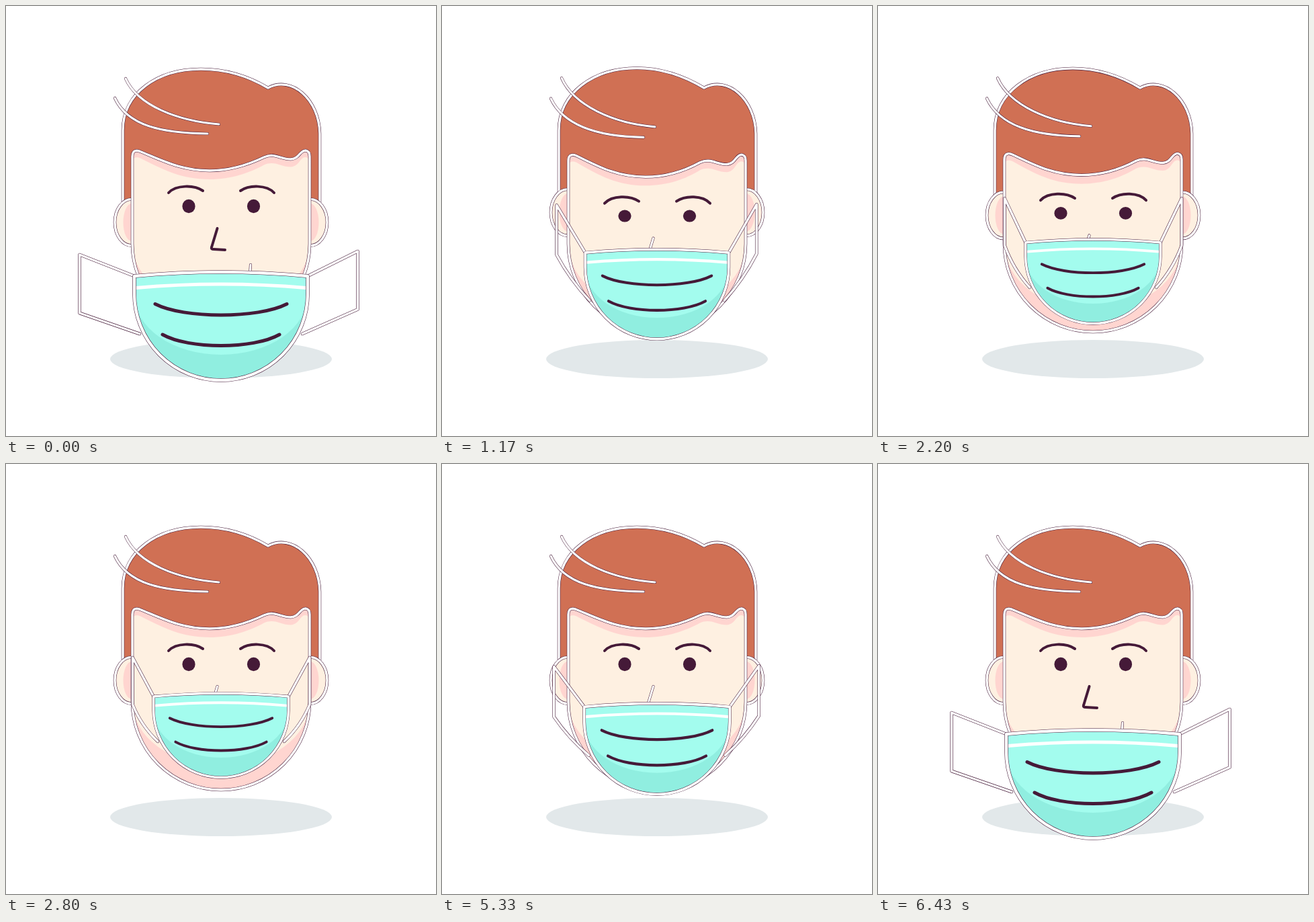
An HTML page with a canvas that plays this animation: 640 by 640 pixels, repeating every 7210 ms.

```html
<!DOCTYPE html>
<html lang="en">
<head>
<meta charset="utf-8">
<title>Putting on a mask</title>
<style>
html, body { margin: 0; height: 100%; overflow: hidden; background: #fff; }
canvas { display: block; width: 100vmin; height: 100vmin; }
</style>
</head>
<body>
<canvas id="stage" width="640" height="640"></canvas>
<script>
const ctx = document.getElementById('stage').getContext('2d');
const LOOP = 7210;
const DARK = '#451a38', HAIR = '#d07054', SKIN = '#fef0e1', PINK = '#ffd5d0';
const MINT = '#a3fcee', TEAL = '#90eee0', GROUND = '#e2e8ea';
ctx.lineCap = ctx.lineJoin = 'round';

function ease(t, from, to) {
  const x = Math.min(1, Math.max(0, (t - from) / (to - from)));
  return x * x * (3 - 2 * x);
}

function fill(path, color) {
  ctx.fillStyle = color;
  ctx.fill(new Path2D(path));
}

function stroke(path, color, width) {
  ctx.strokeStyle = color;
  ctx.lineWidth = width;
  ctx.stroke(new Path2D(path));
}

// White lines with a hairline dark edge, merged where they cross
function outline(width, ...paths) {
  paths.forEach(p => stroke(p, DARK, width));
  paths.forEach(p => stroke(p, '#fff', width - 1.1));
}

function ellipse(x, y, rx, ry, color) {
  ctx.fillStyle = color;
  ctx.beginPath();
  ctx.ellipse(x, y, rx, ry, 0, 0, 7);
  ctx.fill();
}

function clipped(path, draw) {
  ctx.save();
  ctx.clip(new Path2D(path));
  draw();
  ctx.restore();
}

// c and m lower the corners and the middle of the fringe; ry is the chin depth
function facePath(c, m, ry) {
  const w = (c + m) / 2;
  return `M188 354V${224 + c}C188 ${214 + c} 195 ${214 + c} 201 ${217 + c}
    C235 ${231 + m} 262 ${245 + m} 303 ${245 + m}
    C336 ${245 + m} 363 ${235 + m} 384 ${225 + w}
    C400 ${218 + w} 408 ${228 + w} 424 ${228 + w}
    C437 ${227 + w} 437 ${215 + c} 446 ${215 + c}
    Q452 ${216 + c} 452 ${224 + c}V354A132 ${ry} 0 0 1 188 354Z`;
}

function drawHead(nod) {
  const top = 94 - 2 * nod, earY = 322 - 19 * nod;
  const hair = `M174 ${earY}V185C174 130 225 ${top} 290 ${top}
    C330 ${top} 365 107 390 122C425 103 466 139 467 190V${earY}`;
  const end1 = 176 + 5 * nod, end2 = 190 + 7 * nod;
  fill(hair, HAIR);
  outline(4.5, hair);
  outline(4.2,
    `M178 ${108 - nod}C196 148 255 ${end1 - 5} 317 ${end1}`,
    `M162 ${137 + nod}C181 178 230 ${end2 - 1} 300 ${end2}`);

  for (const x of [187, 453]) {
    const ear = `M${x - 25} ${earY}a25 34.5 0 1 1 50 0a25 34.5 0 1 1 -50 0`;
    fill(ear, SKIN);
    ellipse(x, earY, 12.5, 28, PINK);
    outline(4.5, ear);
  }

  const c = 8 * nod, m = 12 * nod;
  const face = facePath(c, m, 131);
  fill(face, PINK);
  clipped(face, () => fill(facePath(c + 10, m + 13, 95 + 7 * nod), SKIN));
  outline(4.5, face);
}

function drawFeatures(nod, maskTop) {
  ctx.save();
  ctx.translate(0, 18.8 * nod);
  for (const x of [272, 368.5]) ellipse(x, 298, 9.6, 10.2 - 1.5 * nod, DARK);
  const lift = 1.5 * nod;
  stroke(`M242 ${278 + lift}C253 ${266 + lift} 280 ${266 + lift} 293 ${275 + lift}`, DARK, 4);
  stroke(`M349 ${275 + lift}C362 ${266 + lift} 388 ${266 + lift} 399 ${278 + lift}`, DARK, 4);
  const nose = 'M314.5 331L306 359Q305 362 309 362L326 363';
  const covered = 365 + 18.8 * nod > maskTop - 2.5;
  if (covered) outline(4, nose);
  else stroke(nose, DARK, 4);
  ctx.restore();
  outline(4, `M364 ${385 + 12 * nod}L363 ${400 + 12 * nod}`);
}

function drawMask(on, nod, top) {
  const s = 1 - 0.222 * on;
  const strap = (side, x, y1, y2) => {
    const bx = 320 + side * 121 * s, by = top + 92 * s;
    return `M${320 + side * 129 * s} ${top + 6 * s}L${x} ${y1}V${y2}
      Q${(x + bx) / 2 + side * 6 * on} ${(y2 + by) / 2 + 4 * on} ${bx} ${by}`;
  };
  const lift = 45 * on * (1 - on) + 3 * nod;
  outline(4.5,
    strap(-1, 109.5 + 79 * on, 370 - 82 * on - lift, 457 - 99 * on - lift),
    strap(1, 523.5 - 71.5 * on, 365 - 77 * on - lift, 451.5 - 93.5 * on - lift));

  ctx.save();
  ctx.translate(320, top);
  ctx.scale(s, s);
  const mask = 'M-129 6Q0 -6 129 6V32A129 129 0 0 1 -129 32Z';
  fill(mask, TEAL);
  clipped(mask, () => fill('M-129 -6H129V34A129 89 0 0 1 -129 34Z', MINT));
  stroke('M-126 23.5Q0 12.5 126 23.5', '#fff', 5);
  stroke('M-98 47.5C-55 69.5 55 69.5 98 47.5', DARK, 5);
  stroke('M-87 93C-48 115 48 115 87 93', DARK, 5);
  outline(5.5, mask);
  ctx.restore();
}

function draw(t) {
  const rise = ease(t, 30, 1680);
  const nod = rise - ease(t, 1680, 2800);
  const on = rise - ease(t, 4750, 6430);
  const top = 396 - 54.7 * on + 11 * nod;
  ctx.clearRect(0, 0, 640, 640);
  ellipse(320, 525.5, 165, 28.5, GROUND);
  drawHead(nod);
  drawFeatures(nod, top);
  drawMask(on, nod, top);
}

const start = performance.now();
function tick() {
  draw((performance.now() - start) % LOOP);
  requestAnimationFrame(tick);
}
tick();
</script>
</body>
</html>
```
